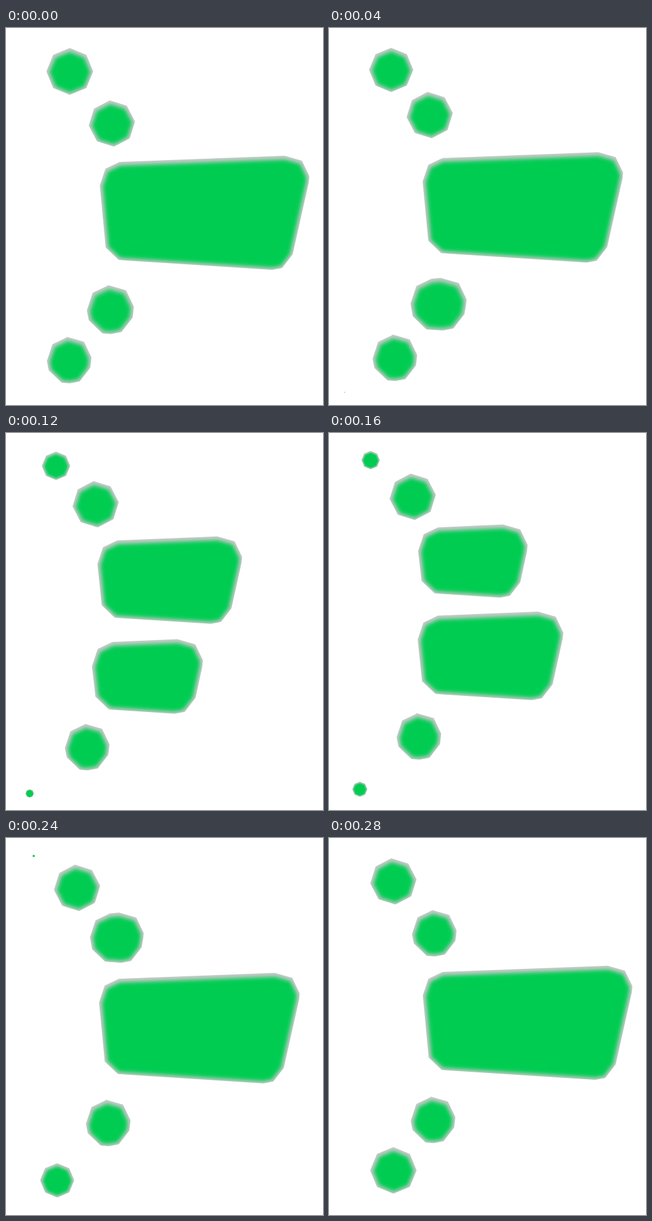
These frames come from a looping animation (512x608 px, 0.32 s). An HTML page with a canvas:

```html
<!DOCTYPE html>
<html lang="en">
<head>
<meta charset="utf-8">
<title>Scrolling wheel of shapes</title>
<style>
  html, body { margin: 0; height: 100%; overflow: hidden; background: #fff; }
  canvas { display: block; }
</style>
</head>
<body>
<canvas id="stage" width="512" height="608"></canvas>
<script>
const ctx = document.getElementById('stage').getContext('2d');
const GREEN = '#00cc52', GREY = '#cacaca';
const RADIUS = 37, STEPS = 8, STEP_MS = 40;

// Rounding offsets for each corner: top left, top right, bottom right, bottom left.
const ROUNDING = [
  [[-36, 1], [-27, -26], [-4, -37]],
  [[-4, -38], [24, -30], [36, -5], [35, 5]],
  [[34, 12], [17, 34], [1, 37]],
  [[1, 37], [-12, 36], [-33, 16]]
];

const LOWER = [168.5, 454.5], UPPER = [170, 154];
const PANEL = [[187.5, 253], [454, 244], [429, 353], [194, 338]];

const smooth = p => p * p * (3 - 2 * p);
const bend = (p, amount) => p + amount * p * (1 - p);
const mix = (a, b, px, py = px) => [a[0] + (b[0] - a[0]) * px, a[1] + (b[1] - a[1]) * py];

// Points are [anchor x, anchor y, offset x, offset y]; the offset part sets the rim.
function outline(points, scale, dx = 0, dy = 0) {
  ctx.beginPath();
  for (const [x, y, ox, oy] of points) ctx.lineTo(x + ox * scale + dx, y + oy * scale + dy);
  ctx.closePath();
}

function blob(points, r) {
  if (r <= 0) return;
  const k = r / RADIUS;
  ctx.save();
  outline(points, 1);
  ctx.clip();
  ctx.fillStyle = GREY;
  ctx.fillRect(0, 0, 512, 608);
  ctx.filter = `blur(${3.3 * k}px)`;
  ctx.fillStyle = GREEN;
  outline(points, 0.87, 0.2 * k, 1.3 * k);
  ctx.fill();
  ctx.restore();
}

function octagon([x, y], r, turn = 0) {
  const points = Array.from({ length: 8 }, (_, i) => {
    const a = i * Math.PI / 4 + turn;
    return [x, y, r * Math.cos(a), r * Math.sin(a)];
  });
  blob(points, r);
}

function panel(corners, r = RADIUS) {
  const k = r / RADIUS;
  blob(corners.flatMap(([x, y], i) => ROUNDING[i].map(([ox, oy]) => [x, y, ox * k, oy * k])), r);
}

function draw(p) {
  const s = smooth(p), arc = 4 * s * (1 - s);
  ctx.clearRect(0, 0, 512, 608);

  octagon([103 - 62 * s ** 1.1, 70 - 43.5 * s], 37.8 * (1 - s));
  octagon(mix([171, 154], [104, 70], bend(p, -0.15), bend(p, 0.15)), 37.5, -0.09);
  panel(PANEL.map(c => {
    const [x, y] = mix(c, UPPER, s);
    return [x + 3.2 * arc, y - 4 * arc];
  }));
  panel(PANEL.map(c => mix(LOWER, c, s)), RADIUS + 2 * (1 - s));
  const rising = mix([102, 536], [168, 455], bend(s, 0.2), bend(s, -0.15));
  panel(PANEL.map(() => rising));
  octagon(mix([23.5, 588], [104, 536], p ** 2, p ** 2.4), 37.5 * p ** 2);
}

function tick() {
  const step = Math.floor(performance.now() / STEP_MS) % STEPS;
  draw(step / (STEPS - 1));
  requestAnimationFrame(tick);
}
tick();
</script>
</body>
</html>
```
